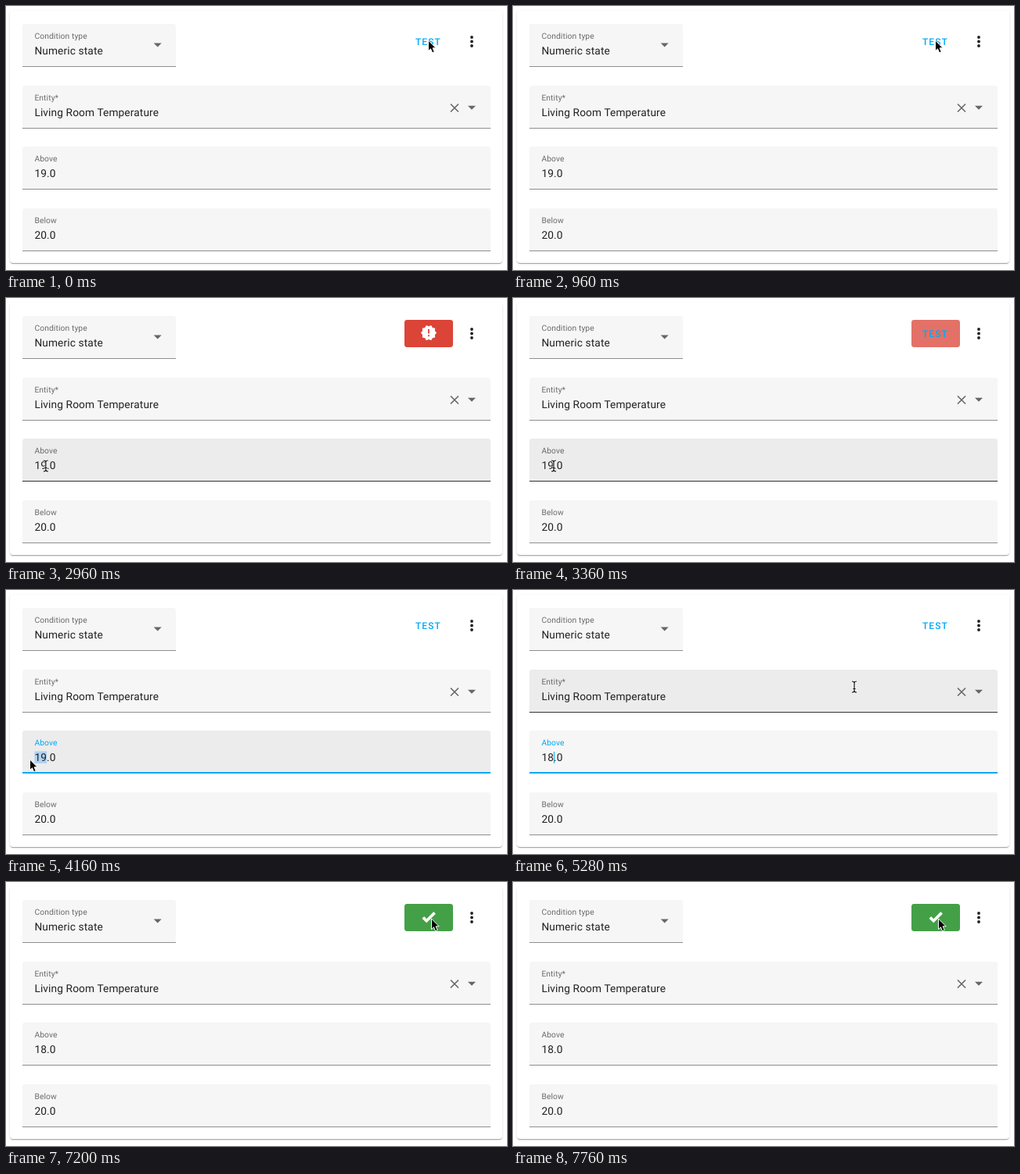
These frames come from a looping animation (640x338 px, 8 s). An HTML page:

```html
<!DOCTYPE html>
<html lang="en">
<head>
<meta charset="utf-8">
<title>Condition test</title>
<style>
  html, body { margin: 0; width: 100%; height: 100%; overflow: hidden; background: #fff; }
  .card {
    position: absolute; left: 5px; top: 6px; width: 629px; height: 323px;
    border-radius: 4px; background: #fff;
    box-shadow: 0 2px 1px -1px rgba(0,0,0,.2), 0 1px 1px rgba(0,0,0,.14), 0 1px 3px rgba(0,0,0,.12);
  }
  svg { position: absolute; left: 0; top: 0; }
  text { font-family: Roboto, Arial, sans-serif; text-rendering: geometricPrecision; }
  .label { font-size: 10.3px; letter-spacing: .009375em; }
  .value { font-size: 13.7px; letter-spacing: .009375em; fill: #212121; }
  .button { font-size: 12px; font-weight: 500; letter-spacing: .0893em; fill: #03a9f4; }
</style>
</head>
<body>
<div class="card"></div>
<svg id="stage" width="640" height="338" viewBox="0 0 640 338"></svg>
<script>
const LOOP = 8000;
const BLUE = '#03a9f4', GREY = '#6b6b6b';
const FAIL = 1040, FAIL_END = 3040, FOCUS = 3360, ERASE = 4500, TYPED = 4800, CLICK = 6500, PASS = 6960;
const TEXT_X = 36.4, DIGIT = 7.82, CARET_X = TEXT_X + 2 * DIGIT;
const ABOVE_TOP = 180;

// Pointer stops: time, x, y
const path = [
  [0, 539.5, 44], [1600, 539.5, 44], [1920, 527.7, 62.3], [2640, 50, 215], [FOCUS, 52, 215],
  [4000, 30.5, 217], [4900, 30.5, 217], [5280, 436, 124], [5700, 542.5, 57],
  [6200, 542.5, 57], [6460, 543.5, 47], [LOOP, 543.5, 47]
];

const icons = {
  alert: 'M23,12L20.56,9.22L20.9,5.54L17.29,4.72L15.4,1.54L12,3L8.6,1.54L6.71,4.72L3.1,5.53L3.44,9.21L1,12L3.44,14.78L3.1,18.47L6.71,19.29L8.6,22.47L12,21L15.4,22.46L17.29,19.28L20.9,18.46L20.56,14.78ZM13,17H11V15H13ZM13,13H11V7H13Z',
  check: 'M9,20.42L2.79,14.21L5.62,11.38L9,14.77L18.88,4.88L21.71,7.71Z'
};

const cursors = {
  arrow: `<path d="M0 0V13.6L3 10.8L5.1 15.8L7.7 14.7L5.6 9.8H9.7Z" fill="#000" stroke="#fff" stroke-linejoin="round"/>`,
  beam: ['#fff" stroke-width="2.6', '#111" stroke-width="1.2'].map(s =>
    `<path d="M-3 -7Q0 -7 0 -5Q0 -7 3 -7M0 -5V5M-3 7Q0 7 0 5Q0 7 3 7M-1.6 2.5H1.6" fill="none" stroke="${s}"/>`).join(''),
  hand: `<path d="M-1.6 .3Q-.2 -1 .9 .6L2.2 4.7Q3.6 3.7 4.3 5Q5.7 4.2 6.3 5.5Q7.8 5 8 6.8Q8.4 9.6 7.3 11.6V14H.2V12.4Q-2 10.4 -4.2 7.2Q-4 5.4 -2.2 6.3L-.7 7.6L-2.2 1.6Z"
    fill="#fff" stroke="#111" stroke-linejoin="round"/><path d="M2.2 8.5V11.5M4.1 8.5V11.5M5.9 8.5V11.5" stroke="#111" stroke-width=".8"/>`
};

const clamp = v => Math.min(1, Math.max(0, v));
const ease = v => (v = clamp(v), v * v * (3 - 2 * v));
const rect = (x, y, w, h, fill, extra = '') =>
  `<rect x="${x}" y="${y}" width="${w}" height="${h}" fill="${fill}" ${extra}/>`;
const label = (cls, x, y, s, extra = '') => `<text class="${cls}" x="${x}" y="${y}" ${extra}>${s}</text>`;
const triangle = (x, y) => `<path d="M${x - 5} ${y}H${x + 5}L${x} ${y + 5}Z" fill="#666"/>`;

function pointer(t) {
  const i = path.findIndex(p => p[0] > t);
  const [t0, x0, y0] = path[i - 1], [t1, x1, y1] = path[i];
  const k = ease((t - t0) / (t1 - t0));
  return [x0 + (x1 - x0) * k, y0 + (y1 - y0) * k];
}

function field(top, width, name, value, [px, py], under = '', focus = 0) {
  const hover = px > 21 && px < 21 + width && py > top && py < top + 55;
  return `<path d="M21 ${top + 55}V${top + 3.4}q0 -3.4 3.4 -3.4H${17.6 + width}q3.4 0 3.4 3.4V${top + 55}Z" fill="${hover ? '#ececec' : '#f6f6f6'}"/>`
    + rect(21, top + 54, width, 1, hover ? '#333' : '#8e8e8e')
    + under
    + label('label', TEXT_X, top + 18.7, name, `fill="${focus > .5 ? BLUE : GREY}"`)
    + label('value', TEXT_X, top + 38.6, value);
}

function aboveField(t, p) {
  const grow = ease((t - FOCUS) / 180);
  const focus = grow * (1 - ease((t - CLICK) / 180));
  let under = '';
  if (focus > 0) {
    const left = CARET_X + (21 - CARET_X) * grow, right = CARET_X + (619 - CARET_X) * grow;
    under = rect(left, ABOVE_TOP + 53, right - left, 2, BLUE, `opacity="${focus}"`);
  }
  if (t >= FOCUS && t < ERASE) {
    const count = Math.min(2, Math.max(0, Math.round((CARET_X - p[0]) / DIGIT)));
    if (count) under += rect(CARET_X - count * DIGIT, 206.5, count * DIGIT, 15.5, '#b0d2f5');
  }
  const value = t < ERASE ? '19.0' : t < TYPED ? '1.0' : '18.0';
  let svg = field(ABOVE_TOP, 598, 'Above', value, p, under, focus);
  if (t >= ERASE && t < CLICK && (t < TYPED || (t - TYPED) % 1000 < 500))
    svg += rect(t < TYPED ? CARET_X - DIGIT : CARET_X, 207, 1, 15, BLUE);
  return svg;
}

function testButton(t, hover) {
  const box = (fill, opacity) => rect(509, 28, 62, 35, fill, `rx="3.4" opacity="${opacity}"`);
  const icon = name => `<path transform="translate(540 44.6) scale(.92) translate(-12 -12)" d="${icons[name]}" fill="#fff" fill-rule="evenodd"/>`;
  if (t >= PASS) return box('#43a047', 1) + icon('check');
  if (t >= FAIL && t < FAIL_END) return box('#db4437', 1) + icon('alert');
  const fade = t >= FAIL_END ? 1 - ease((t - FAIL_END) / 1000) : 0;
  return (fade ? box('#db4437', fade) : '')
    + (hover ? box(BLUE, .05) : '')
    + label('button', 523, 49.5, 'TEST');
}

function pointerShape(t, [x, y], onButton) {
  if (t > ERASE && t < 4900) return '';
  const inField = y > 101 && y < 156 && x < 560 || y > 180 && y < 235 || y > 259 && y < 313;
  const shape = onButton ? 'hand' : inField && x > 36 && x < 604 ? 'beam' : 'arrow';
  return `<g transform="translate(${x} ${y})">${cursors[shape]}</g>`;
}

function draw(t) {
  const p = pointer(t), [x, y] = p;
  const onButton = t > FAIL_END && t < CLICK && x > 509 && x < 571 && y > 28 && y < 63;
  document.getElementById('stage').innerHTML =
    field(23, 196, 'Condition type', 'Numeric state', p)
    + field(102, 598, 'Entity*', 'Living Room Temperature', p)
    + aboveField(t, p)
    + field(259, 598, 'Below', '20.0', p)
    + triangle(193.7, 47.5) + triangle(595, 127.8)
    + `<path d="M568 125.5L578 135.5M578 125.5L568 135.5" stroke="#666" stroke-width="1.6"/>`
    + [40, 45.5, 51].map(cy => `<circle cx="595" cy="${cy}" r="1.9" fill="#212121"/>`).join('')
    + testButton(t, onButton)
    + pointerShape(t, p, onButton);
}

function tick() {
  draw(performance.now() % LOOP);
  requestAnimationFrame(tick);
}
tick();
</script>
</body>
</html>
```
